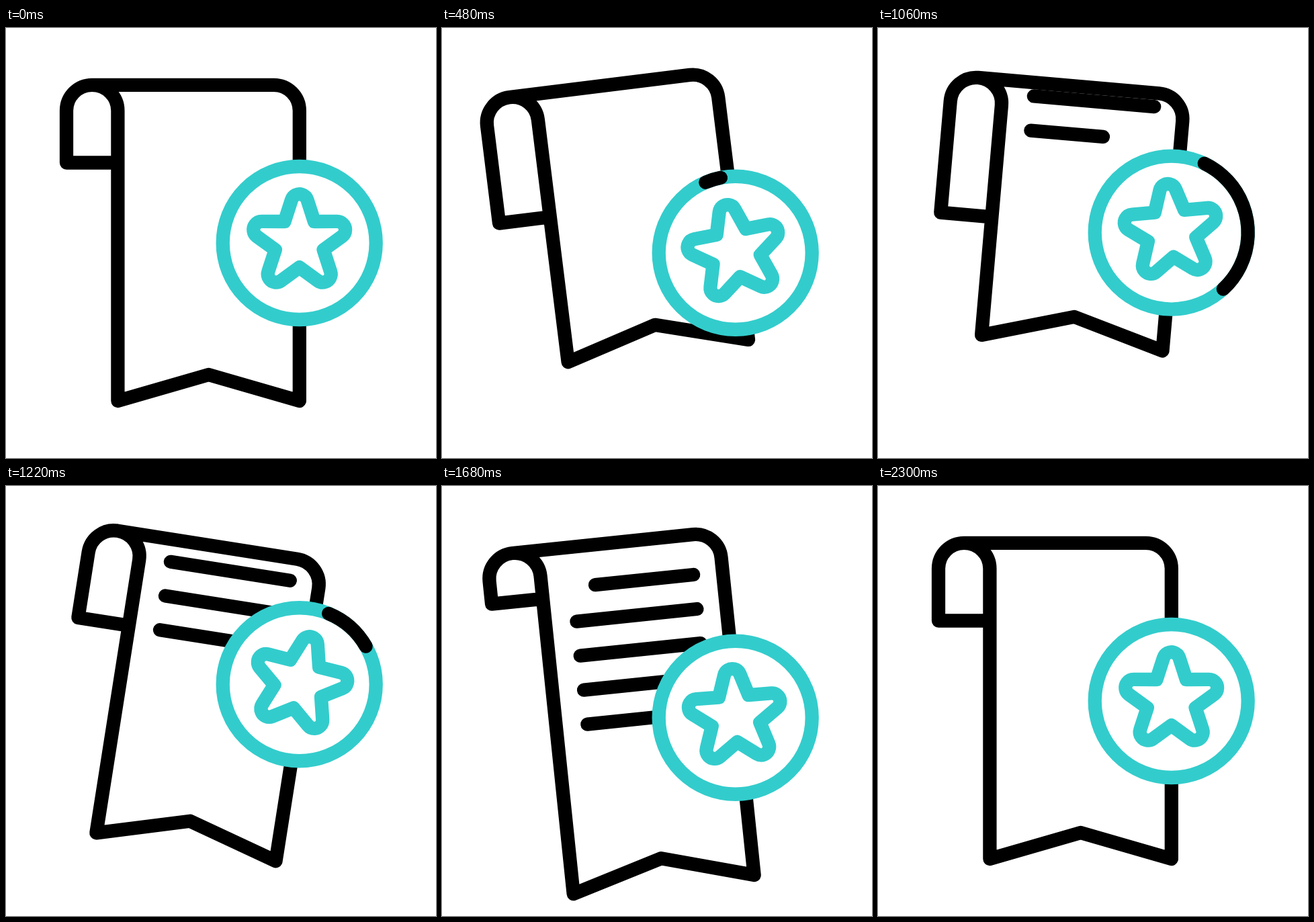
Write an HTML page with a canvas that moves like this. It is 640x640 px and loops after 2.4 s.

```html
<!DOCTYPE html>
<html lang="en">
<head>
<meta charset="utf-8">
<title>Bookmark with star</title>
<style>
  html, body { margin: 0; width: 100%; height: 100%; overflow: hidden; background: #fff; }
  canvas { display: block; width: 640px; height: 640px; }
</style>
</head>
<body>
<canvas id="stage" width="640" height="640"></canvas>
<script>
const ctx = document.getElementById('stage').getContext('2d');
const LOOP = 2400, STEP = 20;
const BLACK = '#000', TEAL = '#33cccc';
const rad = deg => deg * Math.PI / 180;

// Keys are [time, value] pairs, eased in and out between neighbours.
const TILT = [[200, 0], [700, -12], [1200, 9], [1700, -6], [2300, 0]];
const UNROLL = [[200, 0], [800, -152], [1500, 50], [2300, 0]];
const TEXT_Y = [[700, 75], [1700, 350], [2300, 75]];
const BADGE_Y = [[200, 320], [700, 345], [1200, 295], [1700, 345], [2300, 320]];
const STAR_SPIN = [[200, 0], [800, -25], [1400, 25], [1900, -25], [2300, 0]];
const ARC_HEAD = [[400, -101], [1100, -427.5]];
const ARC_TAIL = [[550, -101], [1400, -427.5]];

function valueAt(keys, t) {
  if (t <= keys[0][0]) return keys[0][1];
  for (let i = 1; i < keys.length; i++) {
    const [t0, v0] = keys[i - 1], [t1, v1] = keys[i];
    if (t < t1) {
      const u = (t - t0) / (t1 - t0);
      return v0 + (v1 - v0) * u * u * (3 - 2 * u);
    }
  }
  return keys[keys.length - 1][1];
}

function stroke(color) {
  ctx.strokeStyle = color;
  ctx.stroke();
}

function drawTextLines(lastY) {
  const left = 213, right = 393, gap = 51.3;
  const lines = [[left, 321], [left, right], [left, right], [left, right], [246, right]];
  ctx.save();
  ctx.beginPath();
  ctx.rect(170, 85, 262, 500);
  ctx.clip();
  ctx.beginPath();
  lines.forEach(([x0, x1], i) => {
    const y = lastY - i * gap;
    ctx.moveTo(x0, y);
    ctx.lineTo(x1, y);
  });
  stroke(BLACK);
  ctx.restore();
}

function drawPaper(t) {
  const left = 90, fold = 166.4, right = 436.8, top = 84.8, r = 38.2;
  const mid = (fold + right) / 2, rollX = left + r, rollY = top + r;
  const shift = valueAt(UNROLL, t);
  const bottom = 555 + shift, rollEnd = 200.5 - shift;

  ctx.save();
  ctx.translate(263, 320);
  ctx.rotate(rad(valueAt(TILT, t)));
  ctx.translate(-263, -320);

  ctx.beginPath();
  ctx.moveTo(fold, rollEnd);
  ctx.lineTo(left, rollEnd);
  ctx.lineTo(left, rollY);
  ctx.arc(rollX, rollY, r, Math.PI, 2 * Math.PI);
  ctx.lineTo(fold, bottom);
  ctx.lineTo(mid, bottom - 39);
  ctx.lineTo(right, bottom);
  ctx.lineTo(right, rollY);
  ctx.arc(right - r, rollY, r, 0, -Math.PI / 2, true);
  ctx.lineTo(rollX, top);
  stroke(BLACK);

  if (t > 700 && t < 2300) drawTextLines(valueAt(TEXT_Y, t));
  ctx.restore();
}

function drawStar() {
  const tipDist = 59, tipRadius = 12.3, notchDist = 37.7;
  ctx.beginPath();
  for (let i = 0; i < 5; i++) {
    const a = rad(72 * i - 90), notch = a + rad(36);
    ctx.arc(tipDist * Math.cos(a), tipDist * Math.sin(a), tipRadius, a - rad(72), a + rad(72));
    ctx.lineTo(notchDist * Math.cos(notch), notchDist * Math.sin(notch));
  }
  ctx.closePath();
  stroke(TEAL);
}

function drawBadge(t) {
  const r = 114;
  ctx.save();
  ctx.translate(436.7, valueAt(BADGE_Y, t));

  ctx.beginPath();
  ctx.arc(0, 0, r, 0, 2 * Math.PI);
  ctx.fillStyle = '#fff';
  ctx.fill();
  stroke(TEAL);

  if (t > 400 && t < 1400) {
    ctx.beginPath();
    ctx.arc(0, 0, r, rad(valueAt(ARC_TAIL, t)), rad(valueAt(ARC_HEAD, t) - 0.1), true);
    stroke(BLACK);
  }

  ctx.rotate(rad(valueAt(STAR_SPIN, t)));
  ctx.translate(0, -1.5);
  drawStar();
  ctx.restore();
}

function render(now) {
  const t = Math.floor((now % LOOP) / STEP) * STEP;
  ctx.fillStyle = '#fff';
  ctx.fillRect(0, 0, 640, 640);
  ctx.lineWidth = 20.3;
  ctx.lineCap = ctx.lineJoin = 'round';
  drawPaper(t);
  drawBadge(t);
}

let start = null;
function tick(now) {
  if (start === null) start = now;
  render(now - start);
  requestAnimationFrame(tick);
}
render(0);
requestAnimationFrame(tick);
</script>
</body>
</html>
```
